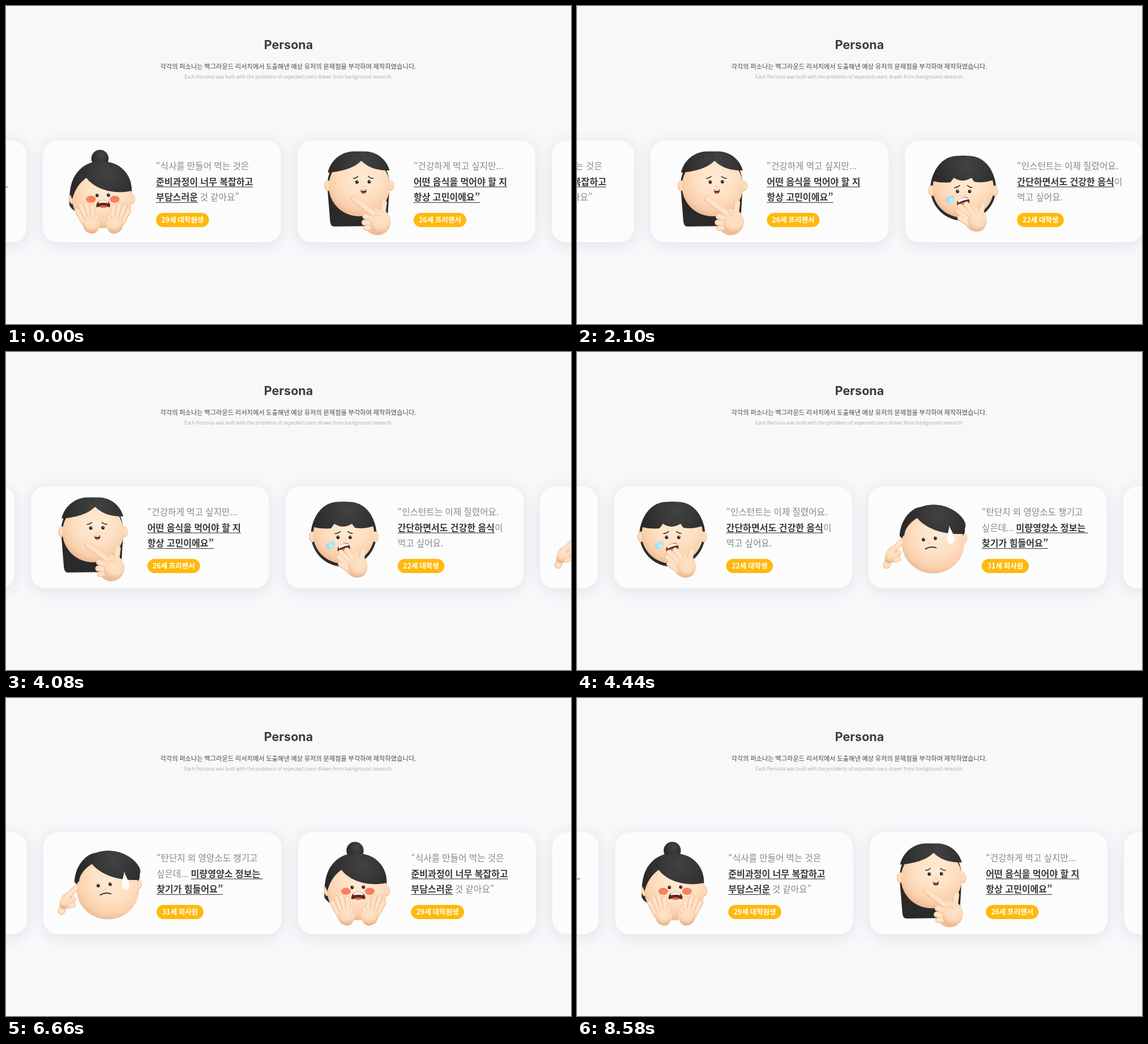
Write an HTML page with a canvas that moves like this. It is 998 px wide and 561 px high and loops after 8.64 s.

```html
<!DOCTYPE html>
<html lang="ko">
<head>
<meta charset="utf-8">
<title>Persona</title>
<style>
html, body { margin: 0; width: 100%; height: 100%; overflow: hidden; background: #f7f8fa; }
canvas { display: block; }
</style>
</head>
<body>
<canvas id="stage" width="998" height="561"></canvas>
<script>
const ctx = document.getElementById('stage').getContext('2d');
const KO = '"Noto Sans CJK KR", "Noto Sans CJK", "Noto Sans KR", sans-serif';
const LOOP = 8640, STEP = 60, PITCH = 449.5, CARD_W = 420.5;
const STARTS = [1920, 4080, 6240, 8280];
const REST = [65, 70, 65.5, 66, 65].map((x, i) => x - i * PITCH);
const INK = '#262322', HAIR = '#303030', SHADE = '#ebbd95';

// ---------- drawing helpers ----------
function fill(d, color) {
  ctx.fillStyle = color;
  ctx.fill(new Path2D(d));
}

function line(d, color, width) {
  ctx.strokeStyle = color;
  ctx.lineWidth = width;
  ctx.lineCap = ctx.lineJoin = 'round';
  ctx.stroke(new Path2D(d));
}

function oval(x, y, rx, ry, color, turn = 0) {
  ctx.beginPath();
  ctx.ellipse(x, y, rx, ry, turn, 0, Math.PI * 2);
  ctx.fillStyle = color;
  ctx.fill();
}

function glow(x, y, r, stops) {
  const g = ctx.createRadialGradient(x, y, 0, x, y, r);
  stops.forEach(([at, color]) => g.addColorStop(at, color));
  return g;
}

function hairTone(x, y) {
  return glow(x, y, 62, [[0, '#424242'], [0.55, '#363636'], [1, '#292929']]);
}

function ear(x, y) {
  oval(x, y, 6.3, 9.5, '#f1c59f');
  oval(x + 0.5, y - 1, 5.2, 8, '#fcdcbd');
}

function face(x, y, rx, ry) {
  oval(x, y, rx, ry, glow(x + 6, y - 16, rx * 1.36,
    [[0, '#ffead4'], [0.5, '#fee0c2'], [0.8, '#f9cfab'], [1, '#e7b189']]));
}

function eyes(x1, y1, x2, y2) {
  for (const [x, y] of [[x1, y1], [x2, y2]]) {
    oval(x, y, 2.9, 3.1, INK);
    oval(x + 0.9, y - 1.1, 0.8, 0.8, '#fff');
  }
}

function nose(x, y) {
  oval(x, y + 1, 3, 2.3, '#f3c49e');
  oval(x, y, 2.8, 2.2, '#ffe1c6');
}

function finger(x1, y1, x2, y2, w) {
  const d = `M${x1} ${y1}L${x2} ${y2}`;
  line(d, SHADE, w);
  ctx.save();
  ctx.translate(0.3, -0.4);
  line(d, '#fcdabb', w - 1.5);
  line(d, '#fee3c9', w * 0.5);
  ctx.restore();
}

function palm(x, y, rx, ry, turn) {
  oval(x, y, rx, ry, glow(x + 2, y - 6, Math.max(rx, ry) * 1.3,
    [[0, '#fee3c8'], [0.6, '#fcdaba'], [1, '#e9b48b']]), turn);
}

// ---------- characters ----------
function openHand() {
  palm(150, 382, 15, 20, -0.25);
  finger(138, 383, 126, 361, 9.5);
  finger(143, 377, 132.5, 353, 10);
  finger(149, 376, 141.5, 351, 10);
  finger(155, 378, 152, 354, 10);
  finger(152, 390, 160, 373, 9);
  palm(149, 386, 13, 15, -0.25);
}

function shocked() {
  fill('M112 352C109 310 130 275 167 274C207 274 223 302 222 330L214 350Q150 372 129 364Q118 362 112 352Z', HAIR);
  oval(166, 269, 15.2, 15.2, glow(169, 263, 18, [[0, '#464646'], [1, '#2a2a2a']]));
  ear(117.5, 340);
  ear(222, 340);
  face(170, 340, 53, 52);
  fill('M113 331C114 300 134 274 167 274C203 274 223 299 222 326C194 333 158 325 142 303C128 313 121 326 117 341Z', hairTone(178, 293));
  line('M142 303C137 297 139 289 146 283', '#252525', 0.9);
  oval(150, 341, 8.6, 6.2, '#fb7f5f');
  oval(192, 341, 8.6, 6.2, '#fb7f5f');
  eyes(161, 334, 181, 333.5);
  nose(172, 340);
  fill('M163 345Q172 341 181 345Q186 351 183 355Q172 352 160 355Q158 350 163 345Z', '#63291f');
  fill('M164 345Q172 341 180 345L181 348Q172 346 163 348Z', '#fff');
  oval(172, 354, 7, 2, '#d9705c');
  openHand();
  ctx.save();
  ctx.translate(342.5, 0);
  ctx.scale(-1, 1);
  openHand();
  ctx.restore();
}

function thoughtful() {
  fill('M567 318C567 284 590 257 622 257C656 257 677 284 677 316L673 382Q671 389 658 388L579 389Q573 389 572 380Z', '#2a2a2a');
  ear(568, 317);
  ear(679, 317);
  face(623.5, 318, 54, 53);
  fill('M568 294C573 271 593 257 613 256.5L634 256.5C655 257 672 271 677 290C655 291 638 284 627 273C615 286 592 292 568 294Z', hairTone(630, 272));
  line('M627 273Q625 264 619 258', '#242424', 0.8);
  line('M613 304Q618 304 621 300.5M639.5 300.5Q643 304 648 304', INK, 1.5);
  eyes(619.5, 310.5, 641, 310);
  nose(631, 316.5);
  fill('M626 324Q631 325 636 323Q637 331 631 331.5Q626 331 626 324Z', '#5b271f');
  fill('M627 324.3Q631 325 635 323.6L635 325.5Q631 326.5 627 326Z', '#fff');
  oval(631.5, 330, 2.8, 1.3, '#da715e');
  finger(664, 370, 667, 347, 11);
  palm(656, 381, 23, 23.5, 0.3);
  finger(652, 369, 614, 340, 11);
  finger(647, 376, 634, 371, 10.5);
  finger(647, 384, 632.5, 382, 10.5);
  finger(648, 391, 635, 392, 9.5);
  palm(660, 382, 17, 20, 0.3);
  line('M650 368Q659 367 663 373', SHADE, 0.8);
}

function yawning() {
  oval(622.5, 321.5, 58, 57.5, '#2c2c2c');
  ear(567, 326);
  ear(678, 326);
  face(622.5, 322, 54, 51.5);
  fill('M567 308C572 282 590 265 611 264.5L634 264.5C655 265 673 282 678 306C665 311 653 312 642 310L637 303Q621 313 606 303L600 311Q583 313 567 308Z', hairTone(630, 281));
  line('M607 320.5Q613 320 616 316.5M630 316.5Q633 320 638 320', INK, 1.5);
  eyes(612.5, 327, 634, 327);
  nose(624, 333);
  fill('M612 345Q617 338 628 337Q636 341 633 349Q622 348 615 355Q610 352 612 345Z', '#632a20');
  fill('M613.5 343Q619 338 628 338L633 341Q623 342 614 347Z', '#fff');
  oval(620, 350, 5, 2.3, '#de7661', -0.5);
  fill('M606 334Q608 347 599 348Q591 347 592 340Q596 335 606 334Z', glow(601, 342, 11, [[0, '#c8f2fb'], [1, '#7fd3ee']]));
  palm(644, 376, 20, 22.5, -0.45);
  finger(651, 373, 657, 351, 10.5);
  finger(643, 371, 628, 350, 10.5);
  finger(639, 376, 617, 354, 10.5);
  finger(637, 382, 613.5, 362, 10.5);
  finger(637, 388, 617, 374, 10);
  palm(647, 380, 16, 18, -0.4);
}

function puzzled() {
  ear(234, 328);
  fill('M121 325C122 293 148 270 180 269.5C216 269 239 297 236 318L228 333L132 335Z', HAIR);
  face(180, 338, 55, 52.5);
  fill('M121 325C122 295 142 274 160 273C167 270 174 269.5 182 269.5C216 270 241 296 237 309L233 321C207 322 172 317 151 292C136 302 130 314 129 324Z', hairTone(190, 286));
  line('M151 292Q148 282 163 274', '#242424', 0.9);
  eyes(163, 331, 184, 328.5);
  nose(173.5, 335.5);
  line('M166.5 347.5Q175 342 185.5 345.5', INK, 1.7);
  fill('M208.5 306C212 316 218 323 218 332C217 341 206 341 205 332C204 323 208 316 208.5 306Z', glow(211, 326, 18, [[0, '#ffffff'], [0.6, '#fafafb'], [1, '#d9dbe1']]));
  finger(105, 360, 98, 376, 13);
  palm(107, 357, 11, 15, 0.45);
  finger(106, 352, 123.5, 335.5, 10.5);
  finger(110, 361, 119, 355, 10);
  finger(112, 367, 119.5, 365, 9);
  palm(104, 361, 9, 12, 0.4);
  line('M113 352Q121 354 119 361', SHADE, 0.8);
}

// Text runs starting with "_" are bold and underlined.
const CARDS = [
  { draw: shocked, origin: 65, textX: 200, badgeW: 93.5, badge: '29세 대학원생',
    lines: [['“식사를 만들어 먹는 것은'], ['_준비과정이 너무 복잡하고'], ['_부담스러운', ' 것 같아요”']] },
  { draw: thoughtful, origin: 514, textX: 205.5, badgeW: 93, badge: '26세 프리랜서',
    lines: [['“건강하게 먹고 싶지만...'], ['_어떤 음식을 먹어야 할 지'], ['_항상 고민이에요”']] },
  { draw: yawning, origin: 519.7, textX: 198, badgeW: 82.5, badge: '22세 대학생',
    lines: [['“인스턴트는 이제 질렸어요.'], ['_간단하면서도 건강한 음식', '이'], ['먹고 싶어요.']] },
  { draw: puzzled, origin: 66, textX: 200, badgeW: 83, badge: '31세 회사원',
    lines: [['“탄단지 외 영양소도 챙기고'], ['싶은데... ', '_미량영양소 정보는 '], ['_찾기가 힘들어요”']] }
];

function text(str, x, y, font, color, align = 'left') {
  ctx.font = font;
  ctx.fillStyle = color;
  ctx.textAlign = align;
  ctx.fillText(str, x, y);
}

function cardBox(x) {
  ctx.save();
  ctx.shadowColor = 'rgba(50, 50, 75, 0.11)';
  ctx.shadowBlur = 26;
  ctx.shadowOffsetY = 4;
  ctx.beginPath();
  ctx.roundRect(x, 237, CARD_W, 180, 26);
  ctx.fillStyle = '#fcfcfd';
  ctx.fill();
  ctx.restore();
}

function cardContent(card, x) {
  ctx.save();
  ctx.translate(x - card.origin, 0);
  card.draw();
  ctx.restore();

  const left = x + card.textX;
  ctx.wordSpacing = '0.6px';
  card.lines.forEach((runs, i) => {
    const y = 288.4 + i * 27.5;
    let pen = left;
    for (const run of runs) {
      const strong = run[0] === '_';
      const str = strong ? run.slice(1) : run;
      const font = strong ? '700 16.1px ' : '300 15.7px ';
      text(str, pen, y, font + KO, strong ? '#3a3a3a' : '#888');
      const w = ctx.measureText(str).width;
      if (strong) ctx.fillRect(pen, y + 2.7, w, 1.1);
      pen += w;
    }
  });
  ctx.wordSpacing = '0px';

  ctx.beginPath();
  ctx.roundRect(left, 365, card.badgeW, 25, 12.5);
  ctx.fillStyle = '#ffb90b';
  ctx.fill();
  text(card.badge, left + card.badgeW / 2, 382.1, `700 12.5px ${KO}`, '#fff', 'center');
}

// ---------- motion ----------
function ease(x) {
  if (x >= 1) return 1;
  const bez = (a, b, u) => 3 * a * u * (1 - u) ** 2 + 3 * b * u * u * (1 - u) + u ** 3;
  let lo = 0, hi = 1;
  for (let i = 0; i < 24; i++) {
    const mid = (lo + hi) / 2;
    if (bez(0.25, 0.25, mid) < x) lo = mid; else hi = mid;
  }
  return bez(0.1, 1, lo);
}

function scrollAt(t) {
  const i = STARTS.filter(s => s <= t).length - 1;
  if (i < 0) return REST[0];
  const elapsed = Math.floor((t - STARTS[i]) / STEP) * STEP + 26;
  return REST[i] + (REST[i + 1] - REST[i]) * ease(elapsed / 360);
}

function render(t) {
  ctx.fillStyle = '#f7f8fa';
  ctx.fillRect(0, 0, 998, 561);
  text('Persona', 499, 75.6, '700 21.5px Inter, sans-serif', '#3b3b3b', 'center');
  text('각각의 퍼소나는 백그라운드 리서치에서 도출해낸 예상 유저의 문제점을 부각하여 제작하였습니다.',
    498.5, 110.9, `400 11.3px ${KO}`, '#484848', 'center');
  text('Each Persona was built with the problems of expected users drawn from background research.',
    499, 127.8, '400 8.35px "Open Sans", sans-serif', '#a9a9ab', 'center');

  const visible = [];
  for (let k = -1; k < 8; k++) {
    const x = scrollAt(t) + k * PITCH;
    if (x > -CARD_W - 40 && x < 1040) visible.push([CARDS[(k + 4) % 4], x]);
  }
  visible.forEach(([, x]) => cardBox(x));
  visible.forEach(([card, x]) => cardContent(card, x));
}

const begin = performance.now();
function tick() {
  render((performance.now() - begin) % LOOP);
  requestAnimationFrame(tick);
}
tick();
</script>
</body>
</html>
```
